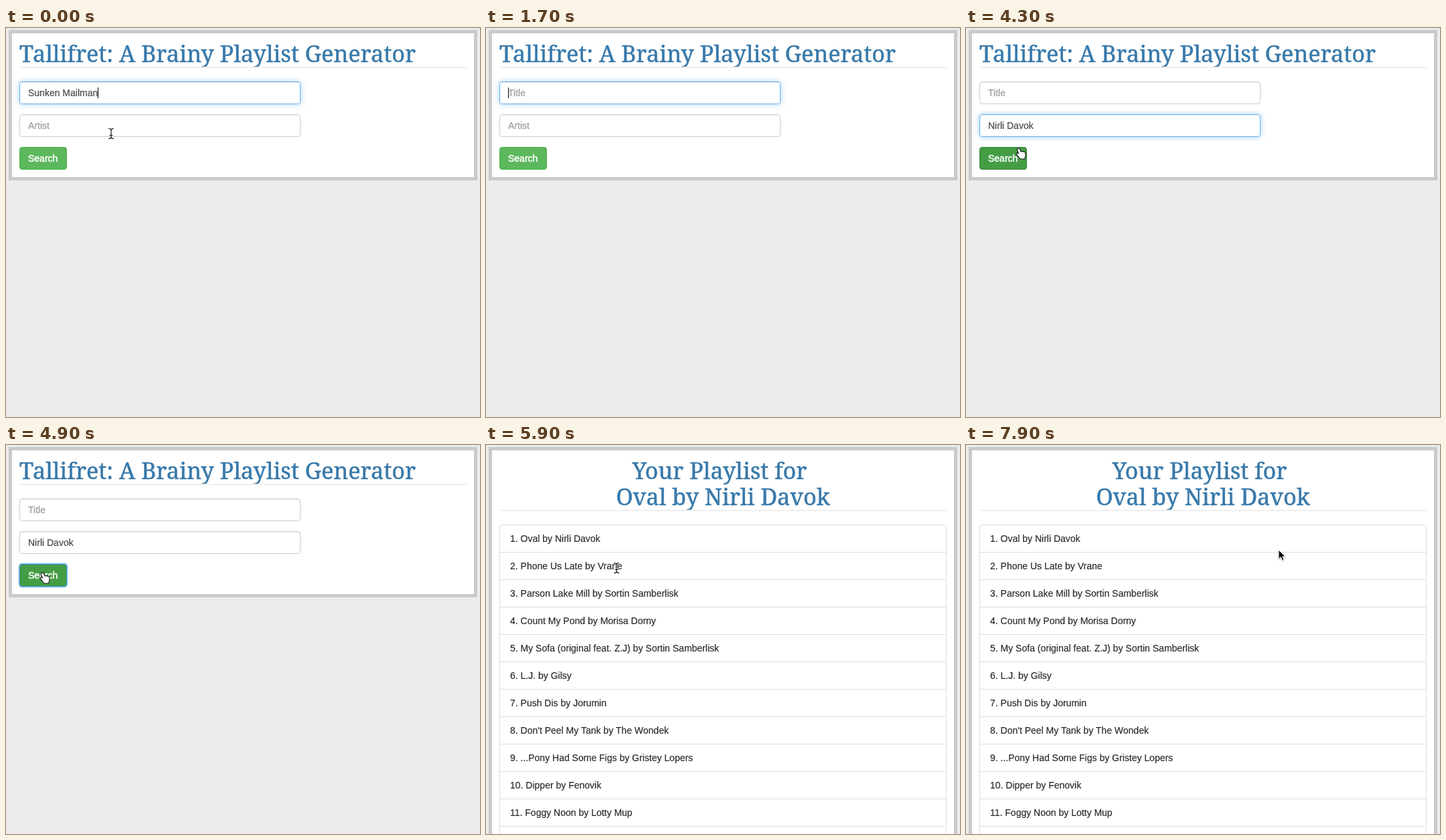
An HTML page that plays this animation: 708 px wide and 582 px high, repeating every 8 s.

```html
<!DOCTYPE html>
<html lang="en">
<head>
<meta charset="utf-8">
<title>Playlist generator</title>
<style>
  html, body { margin: 0; width: 100%; height: 100%; overflow: hidden; background: #ececec; }
  body { position: relative; font: 14px/20px "Liberation Sans", Arial, sans-serif; color: #2c2c2c;
    -webkit-text-stroke: .2px; }
  * { box-sizing: border-box; }
  .page, .page > *, #pointer { position: absolute; }
  .page { left: 4px; top: 3px; width: 700px; background: #fff; border: 5px solid #cacaca; }
  #search { height: 225px; }
  #results { height: 700px; }
  .page > * { margin: 0; white-space: pre; }
  /* children are placed relative to the padding box at (9, 8) */
  h1 { font: 34.2px/38px "Noto Serif", serif; color: #3879aa; top: 11px; left: 11px;
    -webkit-text-stroke: .5px; }
  #results h1 { width: 668px; text-align: center; }
  .rule { left: 11px; width: 668px; height: 2px; background: #eee; }
  .field { left: 11px; width: 420px; height: 34px; padding: 6px 12px; border: 1px solid #ccc;
    border-radius: 4px; color: #484848; box-shadow: inset 0 1px 1px rgba(0,0,0,.075); }
  .field.focus { border-color: #66afe9;
    box-shadow: inset 0 1px 1px rgba(0,0,0,.075), 0 0 8px rgba(102,175,233,.6); }
  .hint { color: #999; }
  .selected { background: #b4d5fe; }
  .caret { display: inline-block; width: 1px; height: 16px; margin-right: -1px;
    background: #000; vertical-align: -3px; }
  #button { left: 11px; top: 170px; width: 71px; height: 34px; padding: 6px 12px; color: #fff;
    background: #5cb85c; border: 1px solid #4cae4c; border-radius: 4px; -webkit-text-stroke: .5px; }
  #button.hover { background: #449d44; border-color: #398439; }
  #button.focus { box-shadow: 0 0 2px 1px #6cb2f5; border-color: #3a8fb8; }
  ol { left: 11px; top: 111px; width: 668px; padding: 0; list-style: none;
    border: 1px solid #ddd; border-radius: 4px; }
  li { height: 41px; padding: 10px 15px; border-bottom: 1px solid #ddd; }
  #pointer { left: 0; top: 0; width: 708px; height: 582px; }
</style>
</head>
<body>
<div class="page" id="search">
  <h1>Tallifret: A Brainy Playlist Generator</h1>
  <div class="rule" style="top:50px"></div>
  <div class="field" id="title" style="top:72px"></div>
  <div class="field" id="artist" style="top:121px"></div>
  <div id="button">Search</div>
</div>
<div class="page" id="results">
  <h1 style="left:6px">Your Playlist for</h1>
  <h1 style="top:50px">Oval by Nirli Davok</h1>
  <div class="rule" style="top:89px"></div>
  <ol></ol>
</div>
<svg id="pointer" viewBox="0 0 708 582">
  <defs>
    <path id="beamShape" fill="none" stroke-linecap="round"
      d="M-3.5-7.5Q-.5-7.5 0-5.5Q.5-7.5 3.5-7.5M0-6V6M-3.5 7.5Q-.5 7.5 0 5.5Q.5 7.5 3.5 7.5M-2 2.5H2"/>
  </defs>
  <g id="beam">
    <use href="#beamShape" stroke="#fff" stroke-width="2.6"/>
    <use href="#beamShape" stroke="#111" stroke-width="1.2"/>
  </g>
  <path id="arrow" d="M0 0V13.5L3.2 10.6L5.4 15.6L7.8 14.6L5.7 9.8H10Z" fill="#000" stroke="#fff"
    style="filter:drop-shadow(0 1px 1px rgba(0,0,0,.35))"/>
  <path id="hand" fill="#fff" stroke="#111" stroke-width="1.1" stroke-linejoin="round"
    d="M-1.5 .5q1.5-1.5 3 .5l1.5 4q1-1 2.2 0q1.2-.8 2.2 .4q1.5-.6 2 1l.6 3q.2 3-1 5v1.6h-7l-4-5q-3-3-1.5-4q1.5-.6 3 1l-2-5.6q-.6-1.5 1-1.9z"/>
</svg>
<script>
const LOOP = 8000, STEP = 100;
const SONG = "Sunken Mailman", SINGER = "Nirli Davok";
const tracks = [
  "Oval by " + SINGER,
  "Phone Us Late by Vrane",
  "Parson Lake Mill by Sortin Samberlisk",
  "Count My Pond by Morisa Dorny",
  "My Sofa (original feat. Z.J) by Sortin Samberlisk",
  "L.J. by Gilsy",
  "Push Dis by Jorumin",
  "Don't Peel My Tank by The Wondek",
  "...Pony Had Some Figs by Gristey Lopers",
  "Dipper by Fenovik",
  "Foggy Noon by Lotty Mup",
  ""
];
// pointer path: time, x, y
const path = [
  [0, 157, 158], [500, 157, 158], [1000, 116, 97], [1900, 116, 97], [2500, 150, 147],
  [3700, 150, 147], [4500, 55, 191], [5200, 55, 191], [5500, 168, 186], [5700, 195, 184],
  [5900, 195, 184], [6400, 189, 214], [6700, 189, 214], [7200, 475, 92], [7600, 475, 92],
  [7900, 467, 157], [LOOP, 467, 157]
];
const CARET = '<span class="caret"></span>';
const $ = id => document.getElementById(id);
const within = (t, from, to) => t >= from && t < to;
const show = (id, on) => $(id).style.display = on ? "" : "none";

document.querySelector("ol").innerHTML =
  tracks.map((name, i) => `<li>${i + 1}. ${name}</li>`).join("");

function pointerAt(t) {
  const i = path.findIndex(p => p[0] > t);
  const [t0, x0, y0] = path[i - 1], [t1, x1, y1] = path[i];
  const k = (t - t0) / (t1 - t0);
  return [x0 + (x1 - x0) * k, y0 + (y1 - y0) * k];
}

function pointerShape(t, x, y) {
  if (within(t, 100, 600) || within(t, 1700, 2000) || within(t, 2900, 3800)) return "";
  if (t >= 5900) return y < 100 || x < 290 ? "beam" : "arrow";
  if (within(x, 20, 91) && within(y, 178, 212)) return "hand";
  const overField = within(y, 80, 114) || within(y, 129, 163);
  return overField ? "beam" : "arrow";
}

const fieldText = (text, hint, caret) =>
  text ? text + caret : `${caret}<span class="hint">${hint}</span>`;

function titleText(t) {
  const marked = s => `<span class="selected">${s}</span>`;
  if (t >= 1700) return "";
  if (t >= 1400) return marked(SONG);
  if (t >= 1300) return SONG.replace(/\S+$/, marked);
  return SONG;
}

function typedCount(t) {
  if (t < 3100) return t < 3000 ? 0 : 1;
  return Math.min(SINGER.length, Math.floor(2 + (t - 3100) * 0.015));
}

function draw(now) {
  const t = Math.floor(now % LOOP / STEP) * STEP;
  const focus = t < 2400 ? "title" : t < 4700 ? "artist" : "button";
  const caretOff = within(t, 400, 600) || within(t, 1200, 1700) ||
    within(t, 2200, 2400) || within(t, 4200, 4700);
  const caretFor = id => id === focus && !caretOff ? CARET : "";
  const [x, y] = pointerAt(t);
  const shape = pointerShape(t, x, y);

  show("search", t < 5900);
  show("results", t >= 5900);
  for (const id of ["title", "artist", "button"]) $(id).classList.toggle("focus", id === focus);
  $("button").classList.toggle("hover", shape === "hand" || focus === "button");
  $("title").innerHTML = fieldText(titleText(t), "Title", caretFor("title"));
  $("artist").innerHTML = fieldText(SINGER.slice(0, typedCount(t)), "Artist", caretFor("artist"));

  for (const id of ["beam", "arrow", "hand"]) show(id, id === shape);
  if (shape) $(shape).setAttribute("transform", `translate(${Math.round(x)} ${Math.round(y)})`);
  requestAnimationFrame(() => draw(performance.now() - start));
}
const start = performance.now();
draw(0);
</script>
</body>
</html>
```
